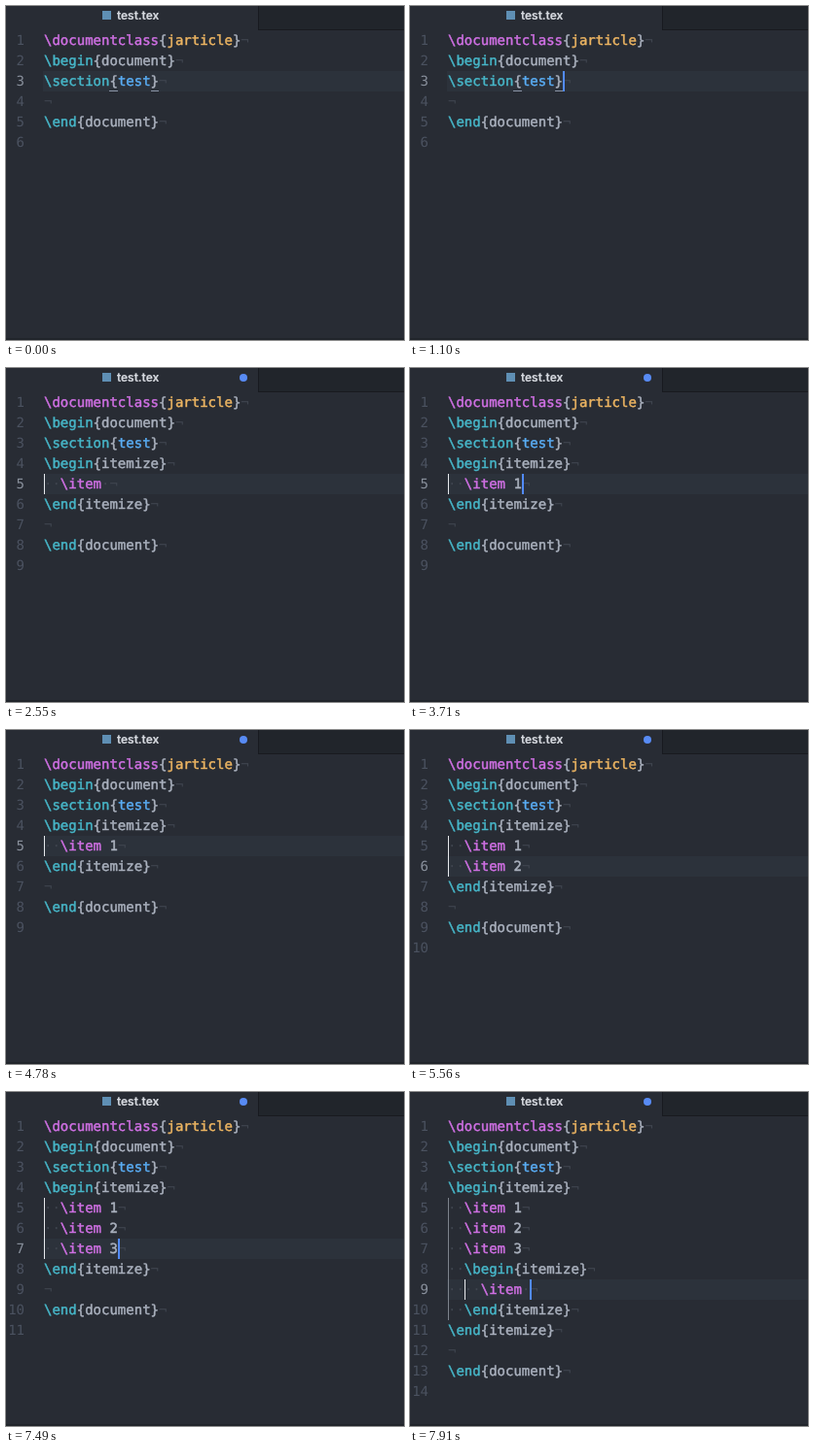
Write an HTML page that moves like this. It is 409x344 px and loops after 8 s.

```html
<!DOCTYPE html>
<html lang="en">
<head>
<meta charset="utf-8">
<title>Editor</title>
<style>
  html, body { margin: 0; width: 100%; height: 100%; overflow: hidden; background: #282c34; }
  #stage { position: relative; width: 409px; height: 344px; overflow: hidden; background: #282c34; }
  #stage div { position: absolute; }
  #bar { left: 259px; top: 0; width: 150px; height: 25px; box-sizing: border-box; background: #21252b;
    border: solid #181a1f; border-width: 0 0 1px 1px; }
  #icon { left: 99px; top: 5px; width: 9px; height: 9px; background: #5f8fb4; }
  #title { left: 114px; top: 2px; font: 600 12px/15px Inter, "Liberation Sans", sans-serif;
    letter-spacing: -.05px; color: #d7dae0; white-space: pre; -webkit-text-stroke: .2px; }
  #dot { left: 240px; top: 6px; width: 8px; height: 8px; border-radius: 50%; background: #588bf4; }
  #foot { left: 0; top: 342px; width: 409px; height: 2px; background: #21252b; }
  #code { left: 0; top: 25px; width: 409px; height: 317px;
    font: 14px/21px "DejaVu Sans Mono", monospace; text-rendering: geometricPrecision; color: #abb2bf; }
  .line { left: 0; width: 409px; height: 21px; }
  .line.on { background: linear-gradient(#2c323b, #2c323b) 38px 0 no-repeat; }
  .num { left: 0; top: 1px; width: 19px; text-align: right; color: #4b5260; }
  .on .num { color: #8a919d; }
  .text { left: 39px; top: 1px; white-space: pre; -webkit-text-stroke: .45px; }
  .kw { color: #d070e4; }
  .fn { color: #47b7c9; }
  .cls { color: #edb562; }
  .sec { color: #5aaef6; }
  .inv { color: #3f454f; -webkit-text-stroke: 0; }
  .guide { width: 1px; }
  .match { width: 8.43px; height: 1px; background: #8b95a7; }
  #caret { width: 2px; height: 21px; background: #528bff; }
</style>
</head>
<body>
<div id="stage">
  <div id="bar"></div>
  <div id="icon"></div>
  <div id="title">test.tex</div>
  <div id="dot"></div>
  <div id="code"></div>
  <div id="caret"></div>
  <div id="foot"></div>
</div>
<script>
const LOOP = 8000, ROW = 21, LEFT = 39, TOP = 25, ADV = 14 * 1233 / 2048;
const $ = id => document.getElementById(id);
const colX = col => Math.round(LEFT + col * ADV);

const head = ['\\documentclass{jarticle}', '\\begin{document}', '\\section{test}'];
const tail = ['', '\\end{document}', ''];
const list = (...items) => [...head, '\\begin{itemize}', ...items, '\\end{itemize}', ...tail];
const one = '  \\item 1', two = '  \\item 2', three = '  \\item 3', blank = '  \\item ';

// at: start time, row/col: caret place, guides: [col, first row, rows, colour]
const active = rows => [[0, 4, rows, '#e6e8eb']];
const scenes = [
  { at: 0, lines: [...head, ...tail], row: 2, col: 14, guides: [], match: [8, 13] },
  { at: 2190, lines: list(blank), row: 4, col: 8, guides: active(1) },
  { at: 3710, lines: list(one), row: 4, col: 9, guides: active(1) },
  { at: 4810, lines: list(one, blank), row: 5, col: 8, guides: active(2) },
  { at: 5290, lines: list(one, two), row: 5, col: 9, guides: active(2) },
  { at: 6440, lines: list(one, two, blank), row: 6, col: 8, guides: active(3) },
  { at: 6800, lines: list(one, two, three), row: 6, col: 9, guides: active(3) },
  { at: 7910, lines: list(one, two, three, '  \\begin{itemize}', '    \\item ', '  \\end{itemize}'),
    row: 8, col: 10, guides: [[0, 4, 6, '#7d838c'], [2, 8, 1, '#e6e8eb']] }
];

const caretSteps = [
  [0, 0], [320, 1], [710, 0], [1100, 1], [1510, 0], [1900, 1], [2490, 0], [2870, 1], [3290, 0],
  [3710, 1], [3980, 0], [4400, 1], [4780, 0], [4810, 1], [5110, 0], [5290, 1], [5560, 0],
  [5970, 1], [6360, 0], [6440, 1], [6740, 0], [6800, 1], [7070, 0], [7490, 1]
];
const dotSteps = [[0, 0], [2490, .35], [2520, .7], [2550, 1]];
const stepAt = (steps, t) => steps.filter(s => s[0] <= t).pop()[1];

const span = (cls, text) => text ? `<span class="${cls}">${text}</span>` : '';
const dots = text => span('inv', '·'.repeat(text.length));

function paint(line) {
  const [, lead, body, trail] = line.match(/^( *)(.*?)( *)$/);
  const [, cmd, rest] = body.match(/^(\\\w+)?(.*)$/);
  const cls = /document|item$/.test(cmd) ? 'kw' : 'fn';
  const arg = { '\\documentclass': 'cls', '\\section': 'sec' }[cmd];
  const shown = arg ? rest.replace(/\w+/, w => span(arg, w)) : rest;
  return dots(lead) + span(cls, cmd) + shown + dots(trail);
}

function build(scene) {
  const last = scene.lines.length - 1;
  const rows = scene.lines.map((line, i) =>
    `<div class="line${i === scene.row ? ' on' : ''}" style="top:${i * ROW}px">` +
    `<div class="num">${i + 1}</div>` +
    `<div class="text">${paint(line)}${i < last ? span('inv', '¬') : ''}</div></div>`);
  const guides = scene.guides.map(([col, row, n, color]) =>
    `<div class="guide" style="left:${colX(col)}px;top:${row * ROW}px;height:${n * ROW}px;background:${color}"></div>`);
  const marks = (scene.match || []).map(col =>
    `<div class="match" style="left:${LEFT + col * ADV}px;top:${(scene.row + 1) * ROW - 1}px"></div>`);
  $('code').innerHTML = [...rows, ...guides, ...marks].join('');
  $('caret').style.left = colX(scene.col) + 'px';
  $('caret').style.top = TOP + scene.row * ROW + 'px';
}

let current;
function render(now) {
  const t = now % LOOP;
  const scene = scenes.filter(s => s.at <= t).pop();
  if (scene !== current) build(current = scene);
  $('caret').style.opacity = stepAt(caretSteps, t);
  $('dot').style.opacity = stepAt(dotSteps, t);
}

const start = performance.now();
function tick() {
  render(performance.now() - start);
  requestAnimationFrame(tick);
}
tick();
</script>
</body>
</html>
```
